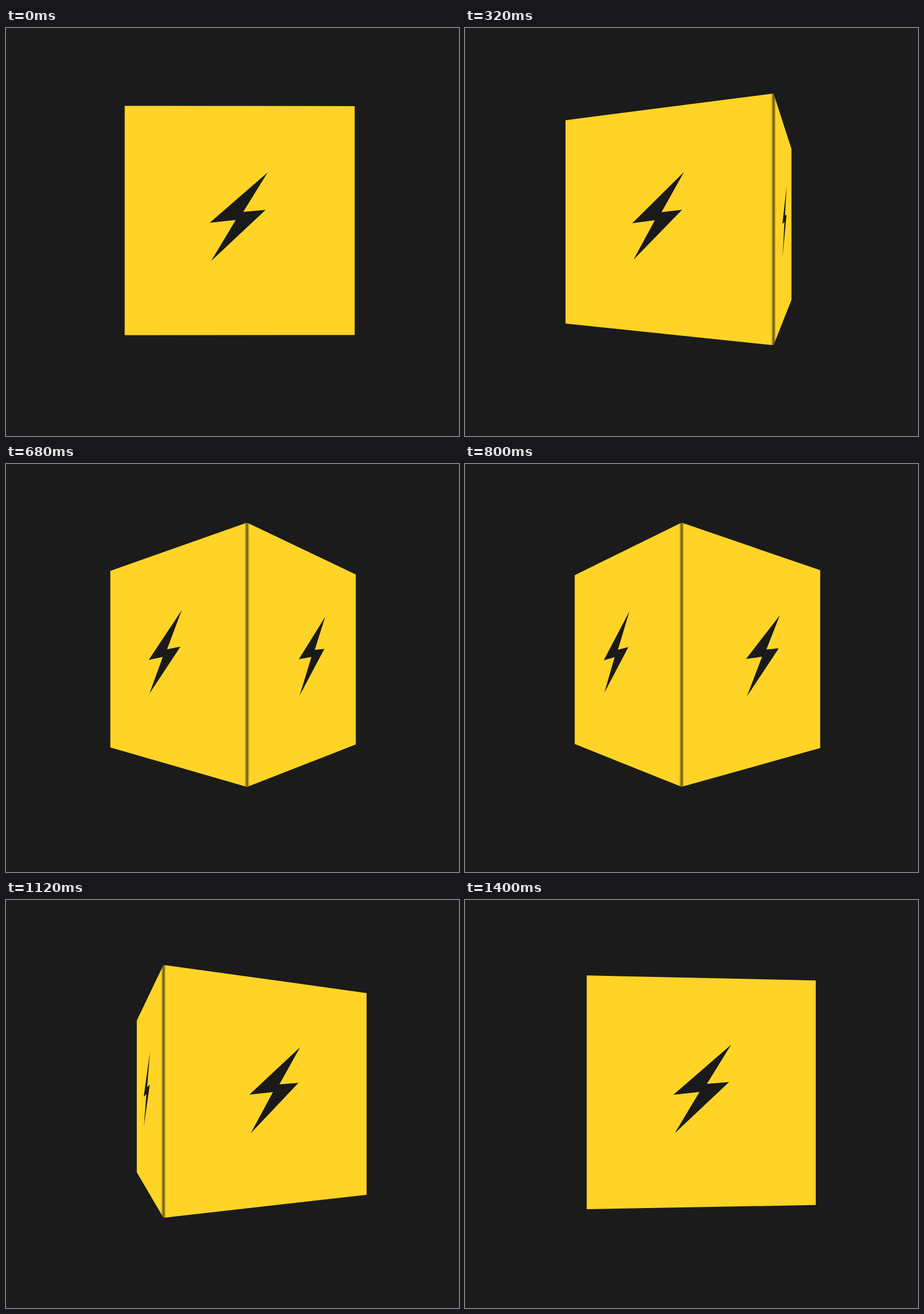
An HTML page for the animation above (1.44 s loop, 789 by 710 pixels).

```html
<!DOCTYPE html>
<html lang="en">
<head>
<meta charset="utf-8">
<title>Turning cube</title>
<style>
  html, body { margin: 0; width: 100%; height: 100%; overflow: hidden; background: #1b1b1b; }
  svg { display: block; width: 100%; height: 100%; }
  .face { fill: #ffd426; }
  .bolt { fill: #1a1a1a; }
  .edge line { stroke: #1b1b1b; }
</style>
</head>
<body>
<svg viewBox="0 0 789 710">
  <g id="left"><polygon class="face"/><polygon class="bolt"/></g>
  <g id="right"><polygon class="face"/><polygon class="bolt"/></g>
  <g id="edge" class="edge">
    <line stroke-width="7.5" stroke-opacity=".16"/>
    <line stroke-width="5.5" stroke-opacity=".22"/>
    <line stroke-width="3" stroke-opacity=".34"/>
  </g>
</svg>
<script>
  const LOOP = 1440, STEP = 40;
  const EYE = { x: 394.5, y: 355, dist: 620 };
  const HALF_W = 151.4, HALF_H = 150.7, CENTER_Y = -15.1;
  const SQUARE = [[-HALF_W, -HALF_H], [HALF_W, -HALF_H], [HALF_W, HALF_H], [-HALF_W, HALF_H]];
  const BOLT = [[36.7, -63.3], [4.5, -11.4], [34, -14], [-37.8, 53.3], [-5.3, -0.8], [-39.7, 3]];

  const left = document.getElementById('left');
  const right = document.getElementById('right');
  const edge = document.getElementById('edge');

  // Projects a point of a face that is turned by the given angle.
  function project([u, v], angle, shift) {
    const c = Math.cos(angle), s = Math.sin(angle);
    const x = HALF_W * s + u * c + shift;
    const z = HALF_W * c - u * s;
    const k = EYE.dist / (EYE.dist - z);
    return [EYE.x + x * k, EYE.y + (v + CENTER_Y) * k];
  }

  const toText = pts => pts.map(p => p[0].toFixed(2) + ',' + p[1].toFixed(2)).join(' ');

  // Draws one face and returns its visible width.
  function drawFace(group, angle, shift) {
    const place = p => project(p, angle, shift);
    const box = SQUARE.map(place);
    const width = box[1][0] - box[0][0];
    group.setAttribute('visibility', width > 0 ? 'visible' : 'hidden');
    group.children[0].setAttribute('points', toText(box));
    group.children[1].setAttribute('points', toText(BOLT.map(place)));
    return width;
  }

  function drawEdge(angle, shift, room) {
    const [x, top] = project(SQUARE[1], angle, shift);
    const bottom = project(SQUARE[2], angle, shift)[1];
    edge.setAttribute('opacity', Math.max(0, Math.min(1, room / 8)));
    for (const line of edge.children) {
      line.setAttribute('x1', x);
      line.setAttribute('x2', x);
      line.setAttribute('y1', top);
      line.setAttribute('y2', bottom);
    }
  }

  function draw(ms) {
    const t = Math.floor((ms % LOOP) / STEP) * STEP / 1000;
    const angle = (0.2 - 61.9 * t) * Math.PI / 180;
    const shift = 9.1 - 10 * t + 5.8 * t * t;
    const a = drawFace(left, angle, shift);
    const b = drawFace(right, angle + Math.PI / 2, shift);
    drawEdge(angle, shift, Math.min(a, b));
  }

  function tick() {
    draw(performance.now());
    requestAnimationFrame(tick);
  }
  tick();
</script>
</body>
</html>
```
